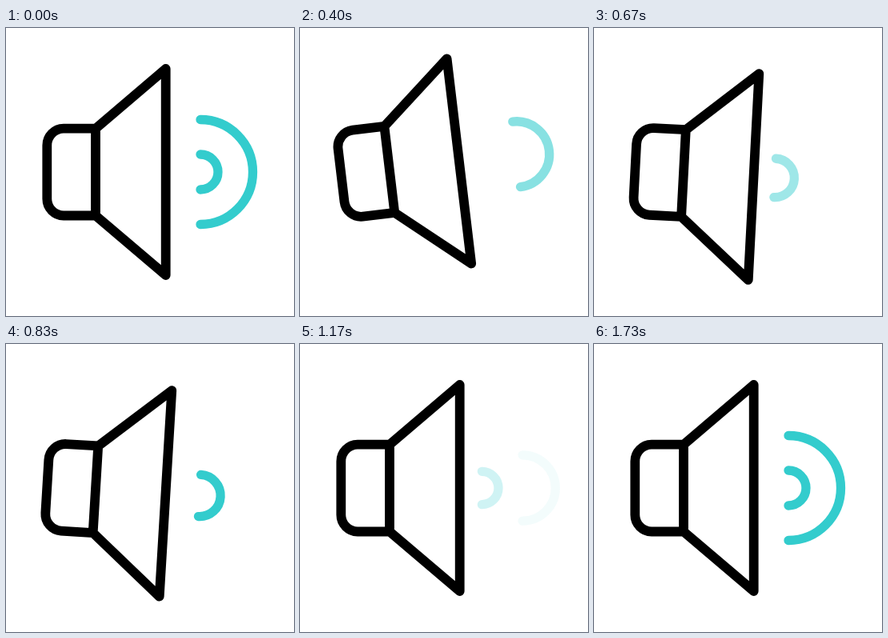
Recreate the animation shown at these times as an HTML page. Size 360 by 360 pixels, loop 2 s.

```html
<!DOCTYPE html>
<html lang="en">
<head>
<meta charset="utf-8">
<title>Speaker</title>
<style>
  html, body { margin: 0; width: 100%; height: 100%; overflow: hidden; background: #fff; }
  svg { display: block; width: 100vw; height: 100vh; }
</style>
</head>
<body>
<svg viewBox="0 0 360 360" fill="none" stroke-linecap="round" stroke-linejoin="round">
  <g id="speaker">
    <g id="waves" stroke="#33cccd" stroke-width="11.3"></g>
    <path stroke="#000" stroke-width="11.8" d="M112 125.700H72A21 21 0 0 0 51.300 146.700V213.500A21 21 0 0 0 72 234.500H112M112 125.700L199.700 51V309L112 234.500Z"/>
  </g>
</svg>
<script>
const LOOP = 2000, FPS = 30, LAST = 52, FADE = 8.6;
const speaker = document.getElementById('speaker');
const group = document.getElementById('waves');

const clamp = u => Math.max(0, Math.min(1, u));
const mix = (a, b, u) => a + (b - a) * u;
const smooth = u => u * u * (3 - 2 * u);
const linear = u => u;
const easeIn = k => u => u ** k;
const easeOut = k => u => 1 - (1 - u) ** k;

// Turning points of the shake: [frame, degrees]
const swings = [[0, 0], [14, -7.2], [22.5, 5.7], [30.5, -4], [35, 0]];

function tilt(f) {
  const i = swings.findIndex(([end]) => f < end);
  if (i < 0) return 0;
  const [f0, a0] = swings[i - 1], [f1, a1] = swings[i];
  return mix(a0, a1, smooth((f - f0) / (f1 - f0)));
}

// Each arc runs from one centre and radius to another between two frames.
const wave = (start, end, x, r, fade, easeX = linear, easeR = easeX) => {
  const path = document.createElementNS('http://www.w3.org/2000/svg', 'path');
  group.append(path);
  return f => {
    const p = clamp((f - start) / (end - start));
    const cx = mix(...x, easeX(p)), cr = mix(...r, easeR(p));
    const shown = fade.in ? clamp((f - start) / FADE) : 1;
    const left = fade.out ? clamp((end - f) / FADE) : 1;
    path.setAttribute('d', `M${cx} ${180 - cr}A${cr} ${cr} 0 0 1 ${cx} ${180 + cr}`);
    path.setAttribute('opacity', Math.min(shown, left));
  };
};

const settle = easeOut(1.75);
const waves = [
  wave(0, 9, [243, 265], [65.5, 84.5], { out: true }),
  wave(0, 17, [243, 284], [22, 49], { out: true }),
  wave(16, 35.5, [216, 280], [24, 42.5], { in: true, out: true }, easeIn(1.15), easeIn(2.8)),
  wave(33, LAST, [224, 243], [11, 65.5], { in: true }, settle),
  wave(35, LAST, [222, 243], [3, 22], { in: true }, settle)
];

function draw(ms) {
  const f = Math.min(LAST, Math.floor(ms % LOOP * FPS / 1000 + 0.15));
  speaker.setAttribute('transform', `rotate(${tilt(f)} 85 180)`);
  waves.forEach(show => show(f));
}

let start;
function tick(now) {
  start ??= now;
  draw(now - start);
  requestAnimationFrame(tick);
}
draw(0);
requestAnimationFrame(tick);
</script>
</body>
</html>
```
